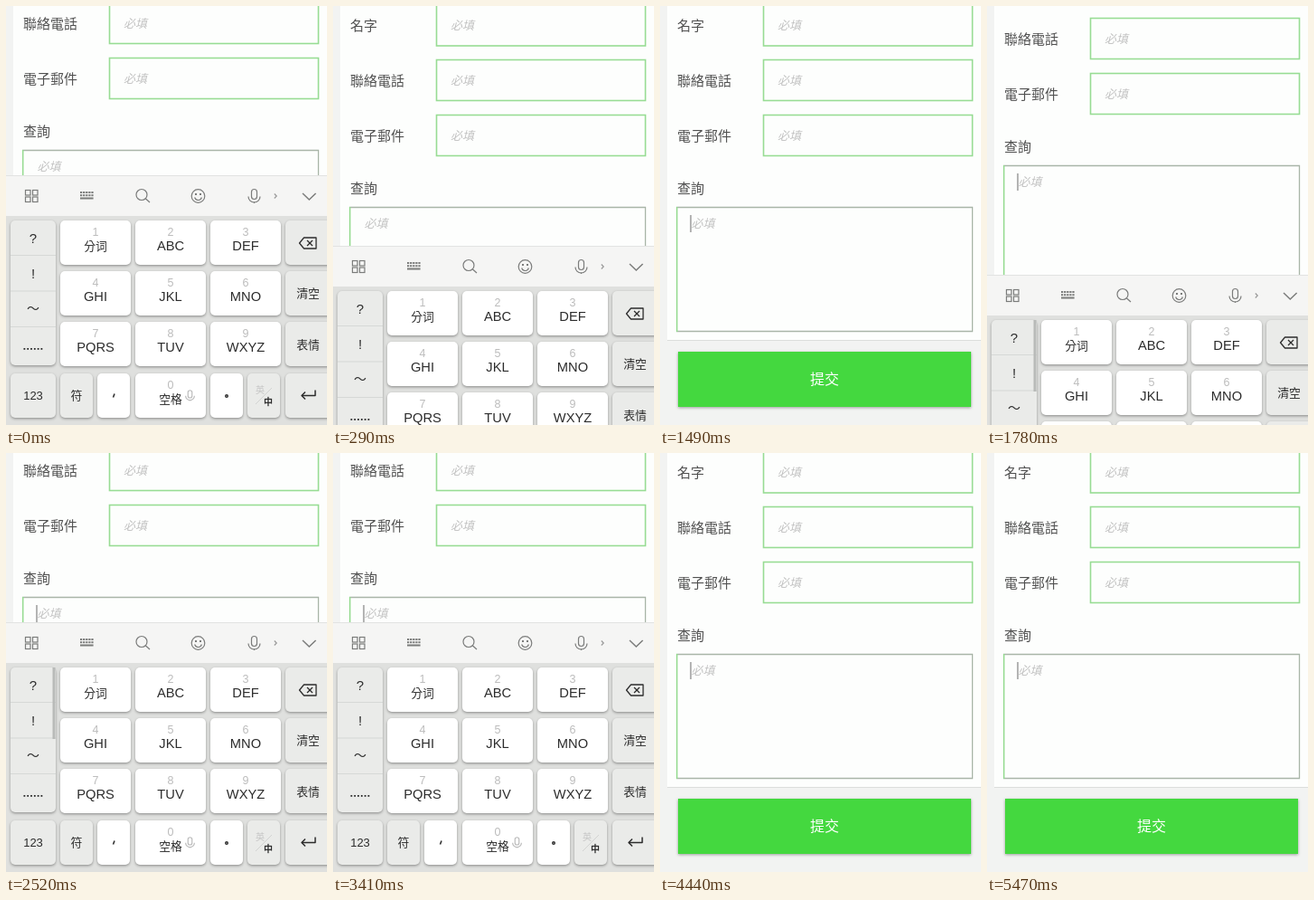
Write an HTML page with a canvas that moves like this. It is 355 px wide and 463 px high and loops after 5760 ms.

```html
<!DOCTYPE html>
<html lang="zh-Hant">
<head>
<meta charset="utf-8">
<title>Form and keyboard</title>
<style>
html, body { margin: 0; width: 100%; height: 100%; overflow: hidden; background: #f2f3f2; }
canvas { display: block; width: 355px; height: 463px; }
</style>
</head>
<body>
<canvas id="stage"></canvas>
<script>
const W = 355, H = 463, LOOP = 5760;
const canvas = document.getElementById('stage');
const ctx = canvas.getContext('2d');
const ratio = window.devicePixelRatio || 1;
canvas.width = W * ratio;
canvas.height = H * ratio;

const FORM_FONT = '"Noto Sans CJK TC", "Noto Sans CJK", sans-serif';
const KEY_FONT = '"Liberation Sans", "Noto Sans CJK SC", "Noto Sans CJK", sans-serif';
const HAN_FONT = '"Noto Sans CJK SC", "Noto Sans CJK", sans-serif';
const GREEN = '#98dc94', INK = '#2c2c2c', ICON = '#7b7c7b', FAINT = '#bcbcbc';
const HIDDEN = 400;

// [start, form scroll, keyboard offset]
const poses = [
  [0, 63, 0], [290, 0, 78], [440, 0, 208], [590, 0, HIDDEN],
  [1780, 46, 110], [1930, 63, 0],
  [3560, 0, 78], [3700, 0, 208], [3850, 0, HIDDEN]
];
// The caret starts hidden and flips at each time.
const caretFlips = [440, 1040, 1490, 2080, 2520, 2970, 3410, 4000, 4440, 4880, 5470];

function text(str, x, cy, size, color, font = KEY_FONT, align = 'center', style = '') {
  ctx.font = `${style} ${size}px ${font}`;
  ctx.textAlign = align;
  ctx.fillStyle = color;
  ctx.fillText(str, x, cy + size * 0.37);
}

const han = (str, x, cy) => text(str, x, cy, 12.8, INK, HAN_FONT, 'center', '500');

function rect(x, y, w, h, color) {
  ctx.fillStyle = color;
  ctx.fillRect(x, y, w, h);
}

function line(points, color, width = 1.2) {
  ctx.beginPath();
  points.forEach(([x, y], i) => i ? ctx.lineTo(x, y) : ctx.moveTo(x, y));
  ctx.strokeStyle = color;
  ctx.lineWidth = width;
  ctx.stroke();
}

function arc(x, y, r, from = 0, to = Math.PI * 2, color = ICON, width = 1.2) {
  ctx.beginPath();
  ctx.arc(x, y, r, from, to);
  ctx.strokeStyle = color;
  ctx.lineWidth = width;
  ctx.stroke();
}

function round(x, y, w, h, r) {
  ctx.beginPath();
  ctx.roundRect(x, y, w, h, r);
}

function field(label, cy) {
  text(label, 19, cy, 15, '#505050', FORM_FONT, 'left');
  ctx.strokeStyle = GREEN;
  ctx.lineWidth = 1.6;
  ctx.strokeRect(114.5, cy - 22.5, 231, 45);
  text('必填', 130, cy, 13, '#c2c2c2', FORM_FONT, 'left', 'italic');
}

function drawForm(scroll, caret) {
  rect(0, 0, W, H, '#f2f3f2');
  ctx.save();
  ctx.translate(0, -scroll);
  rect(8, 0, W - 8, 369, '#fdfefd');
  rect(8, 369, W - 8, 1, '#dcdedc');
  field('名字', 21.5);
  field('聯絡電話', 82);
  field('電子郵件', 143);

  text('查詢', 19, 201.5, 15, '#505050', FORM_FONT, 'left');
  line([[18, 222.5], [345.5, 222.5], [345.5, 359.5], [18, 359.5]], '#a9b5a8', 1.3);
  line([[18.7, 222], [18.7, 360]], GREEN, 1.6);
  text('必填', 34.5, 240.5, 13, '#c2c2c2', FORM_FONT, 'left', 'italic');
  if (caret) rect(33, 231, 2, 19, '#b4b4b4');

  ctx.save();
  ctx.shadowColor = 'rgba(0,0,0,.35)';
  ctx.shadowBlur = 3 * ratio;
  ctx.shadowOffsetY = ratio;
  rect(20, 382, 324, 61, '#44d83f');
  ctx.restore();
  text('提交', 182, 412.5, 16, '#fff', FORM_FONT);
  ctx.restore();
}

function key(x, y, w, h, fill) {
  ctx.save();
  ctx.shadowColor = 'rgba(0,0,0,.36)';
  ctx.shadowBlur = 3 * ratio;
  ctx.shadowOffsetY = 1.2 * ratio;
  ctx.fillStyle = fill;
  round(x, y, w, h, 5);
  ctx.fill();
  ctx.restore();
}

function mic(x, y, s, color) {
  ctx.strokeStyle = color;
  ctx.lineWidth = 1.2;
  round(x - 3 * s, y - 7 * s, 6 * s, 11 * s, 3 * s);
  ctx.stroke();
  arc(x, y + s, 6.5 * s, 0, Math.PI, color);
  line([[x, y + 7 * s], [x, y + 8.5 * s]], color);
}

function drawToolbar() {
  rect(0, 187, W, 45, '#f5f5f4');
  rect(0, 187, W, 1, '#e2e3e2');
  ctx.strokeStyle = ICON;
  ctx.lineWidth = 1.2;
  for (const x of [21.5, 29.5])
    for (const y of [203.5, 211]) ctx.strokeRect(x, y, 5.5, 5.5);
  for (let row = 0; row < 2; row++)
    for (let col = 0; col < 5; col++) rect(82 + col * 3.1, 205 + row * 3.2, 2.2, 2, ICON);
  rect(82, 211.5, 14.6, 2, ICON);

  arc(150, 208.5, 6);
  line([[154.3, 212.8], [159, 217]], ICON);

  arc(212.5, 210, 7.3);
  arc(212.5, 210.5, 4, 0.25, Math.PI - 0.25);
  rect(209, 207, 2, 2, ICON);
  rect(214, 207, 2, 2, ICON);

  mic(274.5, 209.5, 1, ICON);
  line([[296.8, 207.5], [299.2, 210], [296.8, 212.5]], '#999');
  line([[328, 207], [335.3, 214], [342.6, 207]], ICON, 1.5);
}

function drawKeyboard(offset, scrollbar) {
  const GREY = '#eaebe9';
  ctx.save();
  ctx.translate(0, offset);
  rect(0, 232, W, H, '#dfe0de');
  drawToolbar();

  key(5, 237, 50, 160, GREY);
  for (const y of [275, 314.5, 354]) rect(5, y, 50, 1, '#d6d8d6');
  text('?', 30, 256, 15, INK);
  text('!', 30, 295.5, 15, INK);
  text('～', 30, 334, 14, INK);
  for (let i = 0; i < 6; i++) rect(19.5 + i * 3.8, 378, 1.8, 1.8, INK);
  if (scrollbar) rect(51.5, 237, 3, 79, '#b8bab8');

  const letters = ['分词', 'ABC', 'DEF', 'GHI', 'JKL', 'MNO', 'PQRS', 'TUV', 'WXYZ'];
  letters.forEach((label, i) => {
    const x = 60 + i % 3 * 83, y = 237 + Math.floor(i / 3) * 56;
    key(x, y, 78, 49, '#fff');
    text(i + 1, x + 39, y + 12.5, 12.5, FAINT);
    if (i) text(label, x + 39, y + 28, 14.7, INK);
    else han(label, x + 39, y + 28.5);
  });

  for (const y of [237, 293, 349, 406]) key(309, y, 52, 49, GREY);
  ctx.lineJoin = 'round';
  line([[324.5, 262], [329.5, 256], [343, 256], [343, 268], [329.5, 268], [324.5, 262], [325, 261.4]], INK, 1.3);
  line([[333, 259], [339, 265]], INK, 1.3);
  line([[339, 259], [333, 265]], INK, 1.3);
  han('清空', 334, 317.5);
  han('表情', 334, 374);
  line([[342, 424.5], [342, 430.5], [327, 430.5]], INK, 1.5);
  line([[331, 426.5], [327, 430.5], [331, 434.5]], INK, 1.5);

  key(5, 406, 50, 49, GREY);
  text('123', 30, 430.5, 13, INK);
  key(60, 406, 36, 49, GREY);
  han('符', 78, 430.5);
  key(101, 406, 36, 49, '#fff');
  line([[120, 428.5], [118.5, 432.5]], INK, 1.6);
  key(143, 406, 78, 49, '#fff');
  text('0', 182, 418, 12.5, FAINT);
  han('空格', 182, 434.5);
  mic(203.5, 430, 0.75, FAINT);
  key(226, 406, 36, 49, '#fff');
  arc(244, 431, 1.3, 0, Math.PI * 2, INK, 1.4);
  key(267, 406, 36, 49, GREY);
  text('英', 281, 424.5, 10, '#c4c4c4', HAN_FONT);
  line([[276, 440], [294, 422]], '#d2d3d2', 1);
  text('中', 290, 437.5, 10, INK, HAN_FONT, 'center', 'bold');
  ctx.restore();
}

function render(t) {
  const [, scroll, offset] = poses.filter(p => p[0] <= t).pop();
  const caret = caretFlips.filter(f => f <= t).length % 2 === 1;
  ctx.setTransform(ratio, 0, 0, ratio, 0, 0);
  drawForm(scroll, caret);
  if (offset < HIDDEN) drawKeyboard(offset, t >= 1780 && t < 3260);
}

const start = performance.now();
function tick() {
  render((performance.now() - start) % LOOP);
  requestAnimationFrame(tick);
}
tick();
</script>
</body>
</html>
```
